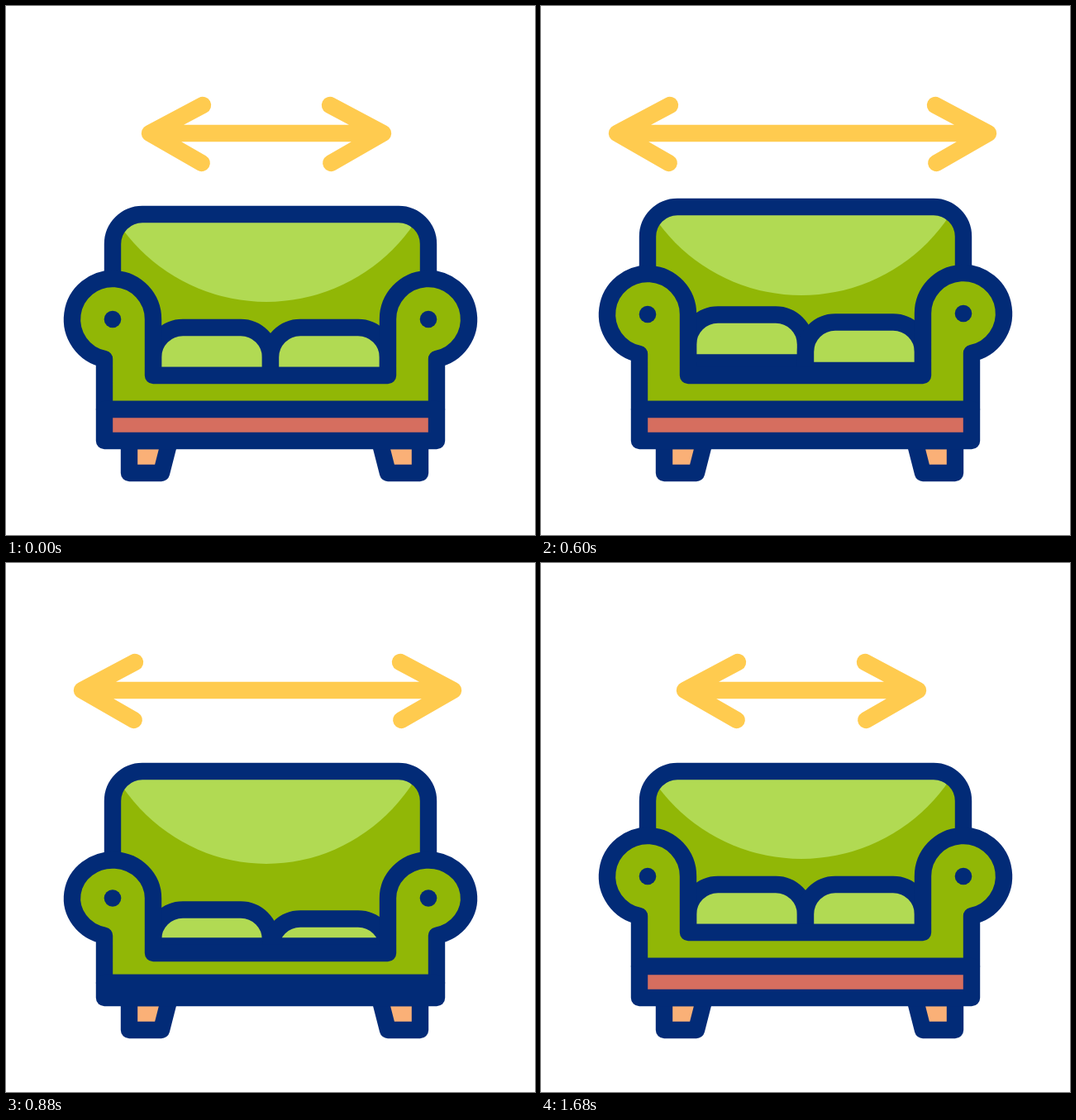
An HTML page with a canvas for the animation above (2000 ms loop, 640 by 640 pixels).

```html
<!DOCTYPE html>
<html>
<head>
<meta charset="utf-8">
<style>
  html, body { margin: 0; width: 100%; height: 100%; overflow: hidden; background: #fff; }
  canvas { display: block; width: 100vmin; height: 100vmin; }
</style>
</head>
<body>
<canvas id="stage" width="640" height="640"></canvas>
<script>
const ctx = document.getElementById('stage').getContext('2d');
const NAVY = '#022b77', GREEN = '#91b706', LIGHT = '#b1da53';
const RED = '#d66e5f', PEACH = '#fab077', YELLOW = '#ffcb4f';
const LOOP = 2000, STEP = 40;

// Smooth curve through [time, value, time, value, ...], flat at turning points
function track(t, ...keys) {
  const n = keys.length / 2, T = i => keys[2 * i], V = i => keys[2 * i + 1];
  if (t <= T(0)) return V(0);
  if (t >= T(n - 1)) return V(n - 1);
  const slope = i => (V(i + 1) - V(i)) / (T(i + 1) - T(i));
  const tangent = i => {
    if (i === 0 || i === n - 1) return 0;
    const a = slope(i - 1), b = slope(i);
    return a * b <= 0 ? 0 : 2 * a * b / (a + b);
  };
  let i = 0;
  while (t > T(i + 1)) i++;
  const span = T(i + 1) - T(i), p = (t - T(i)) / span, q = 1 - p;
  return q * q * (1 + 2 * p) * V(i) + p * p * (3 - 2 * p) * V(i + 1)
    + span * p * q * (q * tangent(i) - p * tangent(i + 1));
}

// Vertical offset of a part during the hop, given its values at the main poses
const hop = (t, crouch, rise, peak, fall, land, rebound) =>
  track(t, 460, 0, 520, crouch, 600, rise, 745, peak, 800, fall, 880, land, 990, rebound, 1080, 0);

function shape(d, fill, stroke = NAVY) {
  const path = new Path2D(d);
  if (fill) { ctx.fillStyle = fill; ctx.fill(path); }
  ctx.strokeStyle = stroke;
  ctx.stroke(path);
}

function drawArrow(t, lift) {
  const clamp = x => Math.min(1, Math.max(0, x));
  const phase = clamp((t - 140) / 350) - clamp((t - 1275) / 375);
  const open = (1 - Math.cos(Math.PI * phase)) / 2;
  const wing = 64 + 28 * Math.sin(Math.PI * phase) ** 2 * 0.5;
  const left = 174 - 82 * open, right = 456 + 85 * open, y = 154 + lift;
  const head = (x, w) => `M${x + w} ${y - 34}L${x} ${y}L${x + w * 0.98} ${y + 36}`;
  shape(`M${left} ${y}H${right}` + head(left, wing) + head(right, -wing), null, YELLOW);
}

function drawBack(t, left, right, bottom) {
  const top = 252 + track(t, 460, 0, 520, 3, 600, -9, 750, -46, 800, -38.5, 880, 0, 930, 10, 1010, -3, 1080, 0);
  const glow = 358 + track(t, 460, 0, 520, 3, 600, -8, 755, -56, 800, -52, 880, 6, 930, 12, 1010, -3, 1080, 0);
  const x0 = 129 + left, x1 = 511 + right;
  const d = `M${x0} ${bottom}V${top + 36}a36 36 0 0 1 36 -36H${x1 - 36}a36 36 0 0 1 36 36V${bottom}Z`;
  ctx.save();
  ctx.clip(new Path2D(d));
  ctx.fillStyle = GREEN;
  ctx.fillRect(0, 0, 640, 640);
  const k = (glow - top) / 106, ry = 216 * k, cy = top - 110 * k;
  ctx.fillStyle = LIGHT;
  ctx.beginPath();
  ctx.ellipse(315, cy, 216 * (1 + right / 196), ry, 0, 0, Math.PI / 2);
  ctx.ellipse(315, cy, 216 * (1 - left / 186), ry, 0, Math.PI / 2, Math.PI);
  ctx.fill();
  ctx.restore();
  shape(d);
}

function drawCushion(x0, x1, top, bottom) {
  shape(`M${x0} ${447 + bottom}V${425 + top}a36 36 0 0 1 36 -36H${x1 - 36}a36 36 0 0 1 36 36V${447 + bottom}Z`, LIGHT);
}

function drawFront(t, left, right, tray, seat) {
  const armL = hop(t, 4, -6, -42, -25.5, 26.5, -5);
  const armR = hop(t, 4, -7, -44, -27.5, 26.5, -5);
  const ry = 49 - Math.max(0, armL) * 0.11, drop = ry * 48 / 49;
  const yL = 379 + armL, yR = 379 + armR;
  shape(`M${178 + left} ${yL}V${tray}H${462 + right}V${yR}
    A49 ${ry} 0 1 1 ${521 + right} ${yR + drop}V${seat}H${119 + left}V${yL + drop}
    A49 ${ry} 0 1 1 ${178 + left} ${yL}Z`, GREEN);
  ctx.fillStyle = NAVY;
  for (const [x, y] of [[129 + left, yL], [511 + right, yR]]) {
    ctx.beginPath();
    ctx.arc(x, y, 10.3, 0, 2 * Math.PI);
    ctx.fill();
  }
}

function draw(t) {
  ctx.clearRect(0, 0, 640, 640);
  ctx.lineWidth = 20.4;
  ctx.lineCap = ctx.lineJoin = 'round';

  const left = track(t, 130, 0, 290, -32, 400, -10.7, 490, 0), right = -0.69 * left;
  const lift = track(t, 600, 0, 755, -30, 800, -22, 880, 0);
  const seat = 488 + hop(t, 0, 0, -29, -17, 20, -3);
  const tray = 447 + hop(t, 0, 0, -29, -16, 25, -4);
  const base = 526 + lift;

  drawArrow(t, lift);
  drawBack(t, left, right, tray);
  drawCushion(178 + left, 320, hop(t, 3, -15.5, -62, -49.5, 30.5, -7), hop(t, 3, -15.5, -62, -53.5, 16.5, -7));
  drawCushion(320, 462 + right, hop(t, 3, -6.5, -42, -22.5, 41.5, -7), hop(t, 3, -6, -42, -31, 16.5, -7));

  const leg = (x, s) => shape(`M${x} ${base}v39h${39 * s}l${10 * s} -39Z`, PEACH);
  leg(149 + left, 1);
  leg(501 + right, -1);
  drawFront(t, left, right, tray, seat);
  shape(`M${119 + left} ${seat}H${521 + right}V${base}H${119 + left}Z`, lift < -1 ? GREEN : RED);
}

function tick() {
  const t = performance.now() % LOOP;
  draw(Math.floor(t / STEP) * STEP);
  requestAnimationFrame(tick);
}
tick();
</script>
</body>
</html>
```
